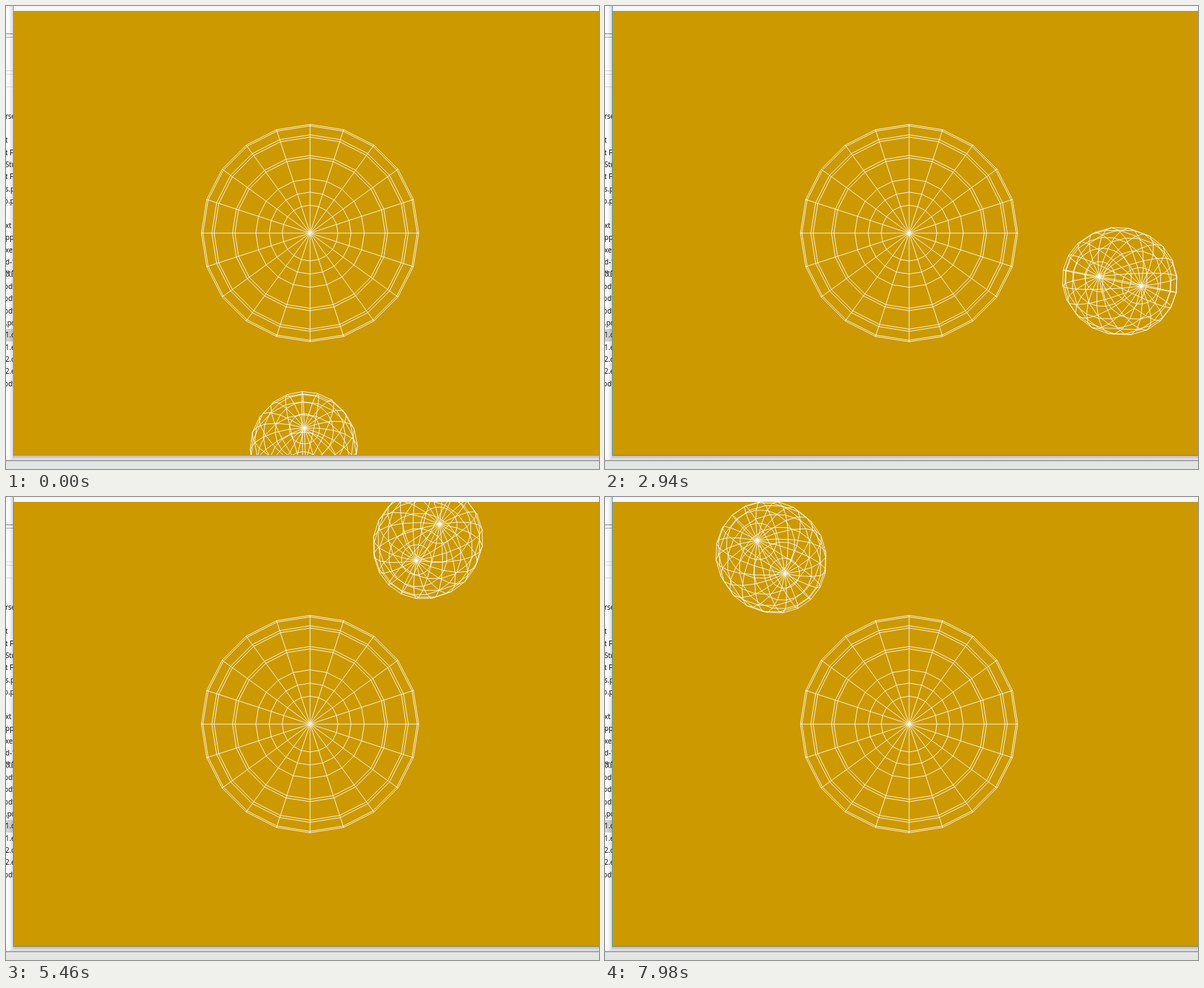
Write an HTML page with a canvas that moves like this. It is 847 by 661 pixels and loops after 8 s.

```html
<!DOCTYPE html>
<html lang="en">
<head>
<meta charset="utf-8">
<title>Wireframe orbit</title>
<style>
  html, body { margin: 0; width: 100%; height: 100%; overflow: hidden; background: #e3e4e4; }
  #stage { position: relative; width: 847px; height: 661px; overflow: hidden; }
  #stage div, canvas { position: absolute; }
  #files {
    left: 0; top: 0; width: 847px; height: 648px; overflow: hidden; background: #fbfbfb;
    border-bottom: 2px solid #a8a8a8;
    font: 10px "Open Sans", "Noto Sans", "Noto Sans CJK SC", sans-serif; color: #000;
  }
  #files .row { height: 17px; line-height: 17px; white-space: pre; }
  #files .rule { left: 0; width: 11px; height: 1px; }
  #selected { left: 0; top: 461px; width: 11px; height: 18px; background: #d4d4d4; }
  #side { left: 4px; top: 0; width: 6px; height: 648px; background: linear-gradient(to right, #0000, #0002); }
  #under { left: 10px; top: 642px; width: 837px; height: 6px; background: linear-gradient(#0004, #0001); }
  #window { left: 10px; top: -2px; width: 850px; height: 643px; border: solid #96968c; border-width: 0 0 1px 1px; background: #f6f6f6; }
  #window.active { border-color: #4a94b8; border-bottom-color: #76865a; }
  canvas { left: 11px; top: 7px; }
</style>
</head>
<body>
<div id="stage">
  <div id="files"><div id="selected"></div></div>
  <div id="side"></div>
  <div id="under"></div>
  <div id="window"></div>
  <canvas id="view" width="836" height="634"></canvas>
</div>
<script>
const LOOP = 8000, STEP = 70, ACTIVATE = 980;
const SLICES = 20, STACKS = 10;
const FOCAL = 317 / Math.tan(Math.PI / 8), EYE = 5, ORBIT = 2;
const CENTER = [423.3, 317.2];
const RAD = Math.PI / 180;

// [step, degrees]
const YEAR = [[0, -91.65], [12, -70.4], [16, -63.1], [27, -41.45], [36, -24.15], [42, -12.87],
  [48, -1.2], [60, 22.2], [67, 35.6], [72, 45.2], [84, 68.9], [89, 78.85], [96, 92.9],
  [108, 118.1], [114, 129.55]];
const SPIN = [[0, 3.6], [16, 3.3], [27, 2], [42, 1.9], [67, 6], [89, 7.2], [114, 3.8]];

function sample(keys, x) {
  let i = 1;
  while (i < keys.length - 1 && keys[i][0] < x) i++;
  const [x0, y0] = keys[i - 1], [x1, y1] = keys[i];
  return y0 + (y1 - y0) * (x - x0) / (x1 - x0);
}

function project(x, y, z) {
  const scale = FOCAL / (EYE - z);
  return [CENTER[0] + x * scale, CENTER[1] - y * scale];
}

function wireSphere(g, cx, cy, radius, turn) {
  const point = (slice, stack) => {
    const a = turn + slice * 2 * Math.PI / SLICES, b = stack * Math.PI / STACKS;
    const r = radius * Math.sin(b);
    return project(cx + r * Math.cos(a), cy + r * Math.sin(a), radius * Math.cos(b));
  };
  const line = (count, at) => {
    g.beginPath();
    for (let i = 0; i <= count; i++) g.lineTo(...at(i));
    g.stroke();
  };
  g.strokeStyle = '#fff';
  g.lineWidth = 0.85;
  for (let k = 1; k < STACKS; k++) line(SLICES, i => point(i, k));
  // Opposite meridians of the central sphere overlap exactly, so each is stroked once per half.
  const halves = cx || cy ? STACKS : STACKS / 2;
  for (let k = 0; k < SLICES; k++) line(halves, i => point(k, i));
}

function backdrop() {
  const layer = document.createElement('canvas');
  layer.width = view.width;
  layer.height = view.height;
  const g = layer.getContext('2d');
  g.fillStyle = '#cc9900';
  g.fillRect(0, 0, layer.width, layer.height);
  wireSphere(g, 0, 0, 1, 0);
  return layer;
}

function addTo(parent, className, style, text = '') {
  const el = document.createElement('div');
  el.className = className;
  el.textContent = text;
  Object.assign(el.style, style);
  parent.append(el);
}

function buildFileList() {
  const files = document.getElementById('files');
  const rows = ['rse', '', 't', 't F', 'Stu', 't F', 's.p', 'p.p', '', 'xt', 'pp', 'xe', 'd-1',
    '数的', 'pdf', 'pdf', 'pdf', '.pd', '1.c', '1.e', '2.c', '2.e', 'pdf'];
  rows.forEach((text, i) => addTo(files, 'row',
    { left: /^p[.d]|^数/.test(text) ? '-3px' : '-1px', top: 148.5 + 17.38 * i + 'px' }, text));
  const rules = [[39, '#999'], [40, '#ddd'], [44, '#aaa'], [92, '#ddd'], [97, '#ddd'], [115, '#ddd']];
  rules.forEach(([y, color]) => addTo(files, 'rule', { top: y + 'px', background: color }));
}

const view = document.getElementById('view');
const frameWindow = document.getElementById('window');
const ctx = view.getContext('2d');
buildFileList();
const scene = backdrop();
const start = performance.now();

function draw(now) {
  const time = Math.max(0, now - start) % LOOP;
  const step = Math.floor(time / STEP);
  const year = sample(YEAR, step) * RAD, spin = sample(SPIN, step) * RAD;
  ctx.drawImage(scene, 0, 0);
  wireSphere(ctx, ORBIT * Math.cos(year), ORBIT * Math.sin(year), 0.5, year + spin);
  frameWindow.classList.toggle('active', time >= ACTIVATE);
  requestAnimationFrame(draw);
}
draw(start);
</script>
</body>
</html>
```
